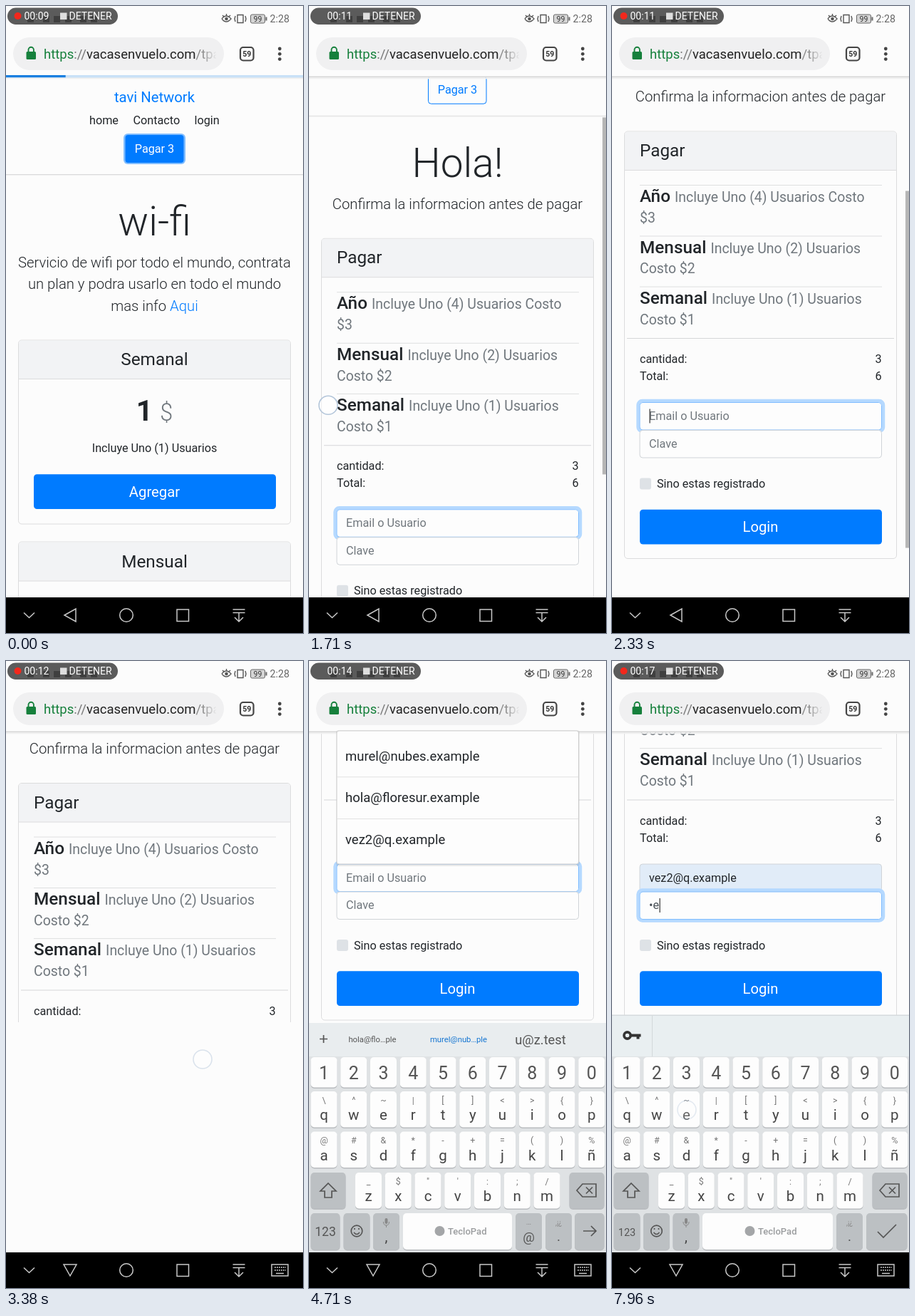
These frames come from a looping animation (417 px wide and 880 px high, 8 s). An HTML page:

```html
<!DOCTYPE html>
<html lang="es">
<head>
<meta charset="utf-8">
<title>Pago móvil</title>
<style>
html, body { margin: 0; width: 100%; height: 100%; overflow: hidden; background: #fcfcfc; }
svg { display: block; width: 100%; height: 100%; font-family: Roboto, sans-serif; }
.icon { fill: none; stroke: #c8c8c8; stroke-width: 1.5; }
</style>
</head>
<body>
<svg id="stage" viewBox="0 0 417 880"></svg>
<script>
const LOOP = 8000, BLUE = '#007bff', INK = '#212529', MUTED = '#70777d';
const BASE = 16.22, LEAD = 20.27, TITLE = 24.33, SMALL = 19.46;
const PAGE_SWAP = 300, FOCUS = 1080, RESIZE = 3340, PICK = 5460, PASS = 6330, KEYS_SWAP = 6420;
const MAIL = 'vez2@q.example';

const rect = (x, y, w, h, fill, extra = '') =>
  `<rect x="${x}" y="${y}" width="${w}" height="${h}" fill="${fill}" ${extra}/>`;
const text = (x, y, size, str, fill = INK, extra = '') =>
  `<text x="${x}" y="${y}" font-size="${size}" fill="${fill}" ${extra}>${str}</text>`;
const mid = (x, y, size, str, fill, extra = '') =>
  text(x, y, size, str, fill, `text-anchor="middle" ${extra}`);
const path = (d, extra = 'class="icon"') => `<path d="${d}" ${extra}/>`;
const group = (id, body, extra = '') => `<g id="${id}" ${extra}>${body}</g>`;
const line = (x1, x2, y, color = '#dedfe0') => path(`M${x1} ${y}H${x2}`, `stroke="${color}"`);
const esc = c => c.replace(/&/g, '&amp;').replace(/</g, '&lt;');
const light = 'font-weight="300"';

const card = (top, bottom, split) =>
  rect(17.5, top, 382, bottom - top, '#fcfcfc', 'rx="4.5" stroke="#dcdcdd"') +
  path(`M18 ${split}V${top + 4}q0-3.5 4-3.5H395q4 0 4 3.5V${split}Z`, 'fill="#f2f3f5"') +
  line(18, 399, split, '#dcdcdd');
const button = (y, label) =>
  rect(39, y, 340, 48.7, BLUE, 'rx="4.5"') + mid(208.5, y + 31.7, LEAD, label, '#fff');
const field = (y, id) =>
  rect(36.5, y - 2.5, 344.5, 43, 'none', `id="${id}Glow" rx="6" stroke="#b5d9ff" stroke-width="4.5"`) +
  rect(39, y, 339.5, 38.5, '#fdfdfd', `id="${id}Box" rx="4" stroke="#d0d4d8"`);
const item = (y, name, detail, price) => line(39, 379, y) +
  text(39, y + 23.7, TITLE, `<tspan font-weight="500">${name}</tspan> <tspan font-size="${SMALL}" fill="${MUTED}">${detail}</tspan>`) +
  text(39, y + 52.5, SMALL, price, MUTED);

const header = mid(208.5, 135, LEAD, 'tavi Network', BLUE) +
  text(117, 165.5, BASE, 'home') + text(178.5, 165.5, BASE, 'Contacto') + text(264.5, 165.5, BASE, 'login') +
  line(0, 417, 236.5, '#d9dadb') + line(0, 417, 237.5, '#f1f1f1');

const home = header +
  rect(165, 179, 87, 43, '#80bdff', 'rx="6"') + rect(167.5, 181, 82, 39, BLUE, 'rx="4"') +
  mid(208.5, 205.7, BASE, 'Pagar 3', '#fff') +
  mid(208.5, 322, 56.8, 'wi-fi', INK, light) +
  mid(208.5, 367, LEAD, 'Servicio de wifi por todo el mundo, contrata', INK, light) +
  mid(208.5, 397.4, LEAD, 'un plan y podra usarlo en todo el mundo', INK, light) +
  mid(208.5, 427.8, LEAD, `mas info <tspan fill="${BLUE}">Aqui</tspan>`, INK, light) +
  card(469, 727, 523.5) + mid(208.5, 504, TITLE, 'Semanal') +
  mid(208.5, 582, 40.5, `<tspan font-weight="700">1</tspan> <tspan font-size="32.4" font-weight="300" fill="${MUTED}">$</tspan>`) +
  mid(208.5, 626.3, BASE, 'Incluye Uno (1) Usuarios') + button(657.3, 'Agregar') +
  card(752, 1010, 807) + mid(208.5, 787.5, TITLE, 'Mensual');

const checkout = header +
  rect(167.5, 181, 81.5, 38.5, 'none', `rx="4" stroke="${BLUE}"`) + mid(208.5, 205.7, BASE, 'Pagar 3', BLUE) +
  mid(208.5, 322, 56.8, 'Hola!', INK, light) +
  mid(208.5, 367, LEAD, 'Confirma la informacion antes de pagar', INK, light) +
  card(408.5, 1008, 463) + text(39, 443.7, TITLE, 'Pagar') +
  item(484, 'Año', 'Incluye Uno (4) Usuarios Costo', '$3') +
  item(555.5, 'Mensual', 'Incluye Uno (2) Usuarios', 'Costo $2') +
  item(626.6, 'Semanal', 'Incluye Uno (1) Usuarios', 'Costo $1') +
  line(21, 396, 699, '#d5d6d8') +
  text(39, 733.5, BASE, 'cantidad:') + text(378.5, 733.5, BASE, '3', INK, 'text-anchor="end"') +
  text(39, 757.7, BASE, 'Total:') + text(378.5, 757.7, BASE, '6', INK, 'text-anchor="end"') +
  field(789, 'mail') + field(828, 'pass') +
  text(52, 813.5, BASE, '', MUTED, 'id="mailText"') + text(52, 852.3, BASE, '', MUTED, 'id="passText"') +
  rect(0, 0, 1.2, 20, '#333', 'id="caret"') +
  rect(39, 895, 16, 16, '#dee2e6', 'rx="3"') + text(63, 908.5, BASE, 'Sino estas registrado') +
  button(939.3, 'Login');

const dropdown = rect(38, 97, 342, 191, '#000', 'rx="4" opacity=".08"') +
  rect(39, 98, 339.5, 187, '#fdfdfd', 'rx="3" stroke="#cfcfcf"') +
  ['murel@nubes.example', 'hola@floresur.example', MAIL].map((mail, i) =>
    text(51, 139.5 + 58.8 * i, 18.5, mail) + (i ? line(39, 378, 104 + 58.8 * i, '#e2e2e2') : '')).join('');

const statusBar = rect(0, 0, 417, 100, '#fcfcfc') +
  rect(2, 2.5, 155, 23.5, '#5b5b5b', 'rx="11.7"') +
  [30, 52, 67, 83, 104, 119].map(x => rect(x, 14, 9, 9, '#2d2d2d', 'opacity=".6"')).join('') +
  '<circle id="dot" cx="16.5" cy="14" r="5" fill="#f3281c"/>' +
  text(25.5, 19.2, 14, '', '#fff', 'id="clock"') + rect(76, 9.5, 9.5, 9.5, '#dedede') +
  text(88.5, 19.2, 14, 'DETENER', '#fff') +
  path('M303 18q6-8 13 0q-7 8-13 0M304 13l2 2M309.5 11v3M315 13l-2 2', 'fill="none" stroke="#555" stroke-width="1.4"') +
  '<circle cx="309.5" cy="18" r="2.3" fill="#555"/>' +
  path('M325 12.5h8v11h-8zM322 14l-1 4 1 4M336 14l1 4-1 4', 'fill="none" stroke="#555" stroke-width="1.4"') +
  rect(343.5, 12, 20, 12, '#d5d5d5', 'rx="2" stroke="#666"') + rect(364.5, 15.5, 2, 5, '#666') +
  mid(353.5, 22, 10.5, '99', '#333') + text(370.5, 23, 14.2, '2:28', '#666');

const toolbar = rect(10, 44, 296, 46, '#f0f0f1', 'rx="23"') +
  rect(28.5, 64, 13.5, 11, '#16803c', 'rx="1.5"') +
  path('M31.5 64v-2.5a3.7 3.7 0 0 1 7.4 0V64', 'fill="none" stroke="#16803c" stroke-width="1.9"') +
  `<g clip-path="url(#urlClip)">` +
  text(53, 73.7, 18.5, '<tspan fill="#16803c">https</tspan><tspan fill="#777">://</tspan>vacasenvuelo.com<tspan fill="#888">/tpago</tspan>', '#222') +
  rect(275, 50, 21, 34, 'url(#urlFade)') + '</g>' +
  rect(329, 58, 18.5, 18.5, 'none', 'rx="4" stroke="#444" stroke-width="2.2"') +
  mid(338.2, 71, 10.5, '59', '#333', 'font-weight="700"') +
  [60, 67.3, 74.6].map(y => `<circle cx="384.3" cy="${y}" r="2.4" fill="#444"/>`).join('') +
  rect(0, 98, 417, 1, '#ececec') + rect(0, 99, 417, 1.3, '#d6d6d6') + rect(0, 100.3, 417, 2, '#efefef') +
  group('progress', rect(0, 97, 417, 3.5, '#c9e1f7') + rect(0, 97, 83, 3.2, '#1a7fe0', 'id="bar"'));

const navBar = rect(0, 830, 417, 50, '#000') +
  path('M25 851.5l7.5 7 7.5-7') +
  path('M82 855L98 846V864Z', 'class="icon" id="back"') +
  '<circle class="icon" cx="169" cy="855" r="9.3"/>' +
  path('M240 847h16.5v16.5h-16.5z') +
  path('M318.5 847h17M318.5 851.5h17M327 851.5v12M321 858l6 6 6-6') +
  group('keyIcon', path('M373 847h23v16h-23zM376 851h17M376 855h17M379 859.5h11', 'class="icon" stroke-dasharray="none"') +
    path('M376 851.5h17M376 855.5h17', 'stroke="#000" stroke-width="3" stroke-dasharray="1 2"'));

// Keyboard
const key = (x, y, w, h, fill = '#fdfdfd') =>
  rect(x, y + 1.5, w, h, '#b9bcbf', 'rx="5"') + rect(x, y, w, h, fill, 'rx="5"');
const grey = '#bcc0c3';
const letters = (chars, hints, x0, y) => [...chars].map((c, i) => {
  const x = x0 + 41.75 * i;
  return key(x, y, 37, 50.5) + mid(x + 18.5, y + 40.3, 20.5, c, '#444') +
    mid(x + 18.5, y + 16.8, 12.5, esc(hints[i]), '#777');
}).join('');
const stroke = 'fill="none" stroke="#555" stroke-width="1.7"';

const mainKeys = rect(0, 555, 417, 275, '#dfe2e4') +
  [...'1234567890'].map((c, i) => key(2.5 + 41.75 * i, 556, 37, 42.5) +
    mid(21 + 41.75 * i, 587, 25, c, '#555')).join('') +
  letters('qwertyuiop', '\\^~|[]<>{}', 2.5, 604) +
  letters('asdfghjklñ', '@#&*-+=()%', 2.5, 660.5) +
  letters('zxcvbnm', `_$"':;/`, 65, 718) +
  key(2.5, 718, 49, 50.5, grey) + path('M27 733l11 11h-6v9h-10v-9h-6z', stroke) +
  key(365.5, 718, 49, 50.5, grey) + path('M376 743l8-9h19v18h-19zM389 738.5l9 9M398 738.5l-9 9', stroke);

const bottomRow = (num, smile, comma, space, at, stop, enter, enterPath) => {
  const [sx, sw] = space, c = sx + sw / 2;
  const special = ([x, w]) => key(x, 775, w, 51, grey);
  const centre = ([x, w]) => x + w / 2;
  const f = centre(smile);
  return [num, smile, comma, stop, enter].map(special).join('') + key(sx, 775, sw, 51) +
    mid(centre(num), 807, num[1] > 40 ? 17.5 : 14.5, '123', '#555') +
    `<circle cx="${f}" cy="800" r="7.8" ${stroke}/>` +
    path(`M${f - 4} 802q4 5 8 0M${f - 3} 796v2M${f + 3} 796v2`, stroke) +
    rect(centre(comma) - 2, 782, 4, 8, '#888', 'rx="2"') +
    path(`M${centre(comma) - 4} 787q0 5 4 5t4-5M${centre(comma)} 792v3`, 'fill="none" stroke="#888"') +
    mid(centre(comma), 815, 20, ',', '#444') +
    `<circle cx="${c - 25}" cy="800" r="7" fill="#a4a6a8"/>` +
    text(c - 13.5, 805, 13, 'TecloPad', '#9a9c9e', 'font-weight="500"') +
    (at ? special(at) + mid(centre(at), 815, 18.5, '@', '#555') + mid(centre(at), 791, 11, '…', '#888') : '') +
    mid(centre(stop), 814, 19, '.', '#555') + mid(centre(stop), 792, 10, ',¡¿', '#888') +
    path(enterPath, stroke);
};
const mailRow = bottomRow([2.5, 41], [48.5, 37], [90, 37], [132, 153], [290, 37], [332, 37], [373, 41.5],
  'M385 800h18M396 793l7 7-7 7');
const passRow = bottomRow([2.5, 37], [44, 37], [85.5, 37], [127, 183], null, [315, 37], [357, 57.5],
  'M373 801l8 8 18-18');

const suggestBar = body => rect(0, 508, 417, 47, '#e9edef') + path('M15 530.5h11M20.5 525v11', stroke) + body;
const keyboard =
  group('suggestA', suggestBar(group('words', mid(89, 535.3, 11.3, 'hola@flo…ple', '#555') +
    mid(210, 535.3, 11.3, 'murel@nub…ple', '#1676d2') + mid(325, 537.5, 18.3, 'u@z.test', '#555'))) ) +
  group('suggestB', suggestBar(mid(88.5, 534.5, 10, 'vez@q.example', '#555') + mid(209.5, 534.5, 10, MAIL, '#1676d2'))) +
  group('keyBar', rect(0, 496.5, 417, 1.5, '#d5dadd') + rect(0, 498, 417, 57, '#e9eff1') +
    path('M56.5 498v57', 'stroke="#d3d8da"') +
    '<circle cx="21.5" cy="525.5" r="4.6" fill="none" stroke="#333" stroke-width="3.6"/>' +
    path('M26 525.5h14.5M36.5 525v5.5', 'stroke="#333" stroke-width="4" fill="none"')) +
  mainKeys + group('mailRow', mailRow) + group('passRow', passRow);

document.getElementById('stage').innerHTML = `
  <defs>
    <clipPath id="pageClip"><rect id="pageArea" y="100" width="417" height="730"/></clipPath>
    <clipPath id="urlClip"><rect x="45" y="45" width="250" height="44"/></clipPath>
    <linearGradient id="urlFade"><stop stop-color="#f0f0f1" stop-opacity="0"/><stop offset="1" stop-color="#f0f0f1"/></linearGradient>
  </defs>` +
  rect(0, 0, 417, 880, '#fcfcfc') +
  `<g clip-path="url(#pageClip)">${group('home', home)}${group('checkout', checkout)}
    ${rect(412, 100, 5, 501, '#b6b6b6', 'id="thumb"')}</g>` +
  statusBar + toolbar + group('dropdown', dropdown) + group('keyboard', keyboard) + navBar +
  '<circle id="touch" r="13" fill="#fff" fill-opacity=".55" stroke="#b4c6da" stroke-width="1.6"/>';

// Animation
const $ = id => document.getElementById(id);
const set = (id, attrs) => { for (const k in attrs) $(id).setAttribute(k, attrs[k]); };
const show = (id, on) => set(id, { display: on ? 'inline' : 'none' });
const write = (id, str) => { if ($(id).textContent !== str) $(id).textContent = str; };

function track(t, points) {
  if (t <= points[0][0]) return points[0][1];
  for (let i = 1; i < points.length; i++) {
    const [t0, v0] = points[i - 1], [t1, v1] = points[i];
    if (t < t1) return v0 + (v1 - v0) * (t - t0) / (t1 - t0);
  }
  return points[points.length - 1][1];
}

const SCROLL = [[1450, 0], [1600, 42], [1960, 172.5], [2120, 212], [2250, 229], [2400, 235.5], [2520, 237],
  [3440, 237], [3520, 420], [3620, 504]];
const CARET_RESETS = [FOCUS, 2960, PICK, PASS, 7440, 7900];
// start, release, x, y (null follows the dragged page)
const TOUCHES = [[1420, 2110, 27, null], [2900, 3290, 276, 559], [5300, 5480, 150, 250],
  [6200, 6330, 80, 340], [7340, 7430, 109, 686], [7790, 7850, 105, 630]];

function draw(t) {
  const scroll = track(t, SCROLL);
  show('home', t < PAGE_SWAP);
  show('checkout', t >= PAGE_SWAP);
  set('checkout', { transform: `translate(0 ${-scroll})` });
  set('pageArea', { height: t < RESIZE ? 730 : 407 });
  set('thumb', { y: 100 + scroll * 730 / 1064,
    opacity: track(t, [[1440, 0], [1480, 1], [2450, 1], [2700, 0]]) });

  set('bar', { width: track(t, [[0, 83], [250, 250], [500, 417]]) });
  set('progress', { opacity: track(t, [[500, 1], [630, 0]]) });

  const rec = t + 460;
  write('clock', '00:' + String(9 + Math.floor(rec / 1000)).padStart(2, '0'));
  show('dot', rec % 1000 >= 380);

  const onPass = t >= PASS, filled = t >= PICK;
  const mailFocus = track(t, [[FOCUS - 20, 0], [1200, 1], [PASS, 1], [PASS + 150, 0]]);
  const passFocus = track(t, [[PASS, 0], [PASS + 150, 1]]);
  set('mailGlow', { opacity: mailFocus });
  set('passGlow', { opacity: passFocus });
  set('mailBox', { fill: filled ? '#e1ecf8' : '#fdfdfd', stroke: mailFocus > .5 ? '#80bdff' : '#d0d4d8' });
  set('passBox', { stroke: passFocus > .5 ? '#80bdff' : '#d0d4d8' });
  const typed = t < 7440 ? '' : t < 7900 ? 'd' : '•e';
  write('mailText', filled ? MAIL : 'Email o Usuario');
  write('passText', typed || 'Clave');
  set('mailText', { fill: filled ? INK : MUTED });
  set('passText', { fill: typed ? '#495057' : MUTED });

  const reset = CARET_RESETS.filter(r => r <= t).pop();
  show('caret', reset !== undefined && (t - reset) % 1000 < 500);
  const used = onPass ? (typed && 'passText') : (filled && 'mailText');
  set('caret', { x: 52.5 + (used ? $(used).getComputedTextLength() : 0), y: onPass ? 837 : 798 });

  show('dropdown', t >= 3710 && t < PICK);
  show('keyboard', t >= 3400);
  const left = 1 - track(t, [[3400, 0], [3600, 1]]);
  set('keyboard', { transform: `translate(0 ${322 * left * left})` });
  const secret = t >= KEYS_SWAP;
  show('suggestA', t < PICK + 80);
  show('words', t >= 3880);
  show('suggestB', t >= PICK + 80 && !secret);
  show('keyBar', secret);
  show('mailRow', !secret);
  show('passRow', secret);
  show('keyIcon', t >= RESIZE);
  set('back', { transform: t >= RESIZE ? 'rotate(-90 90 855)' : '' });

  const touch = TOUCHES.find(([start, end]) => t >= start && t < end + 170);
  show('touch', touch);
  if (touch) {
    const [start, end, x, y] = touch;
    set('touch', { cx: x, cy: y ?? 642.5 - Math.min(scroll, 212),
      opacity: track(t, [[start, 0], [start + 40, 1], [end, 1], [end + 170, 0]]) });
  }
}

function frame() {
  draw(performance.now() % LOOP);
  requestAnimationFrame(frame);
}
frame();
</script>
</body>
</html>
```
